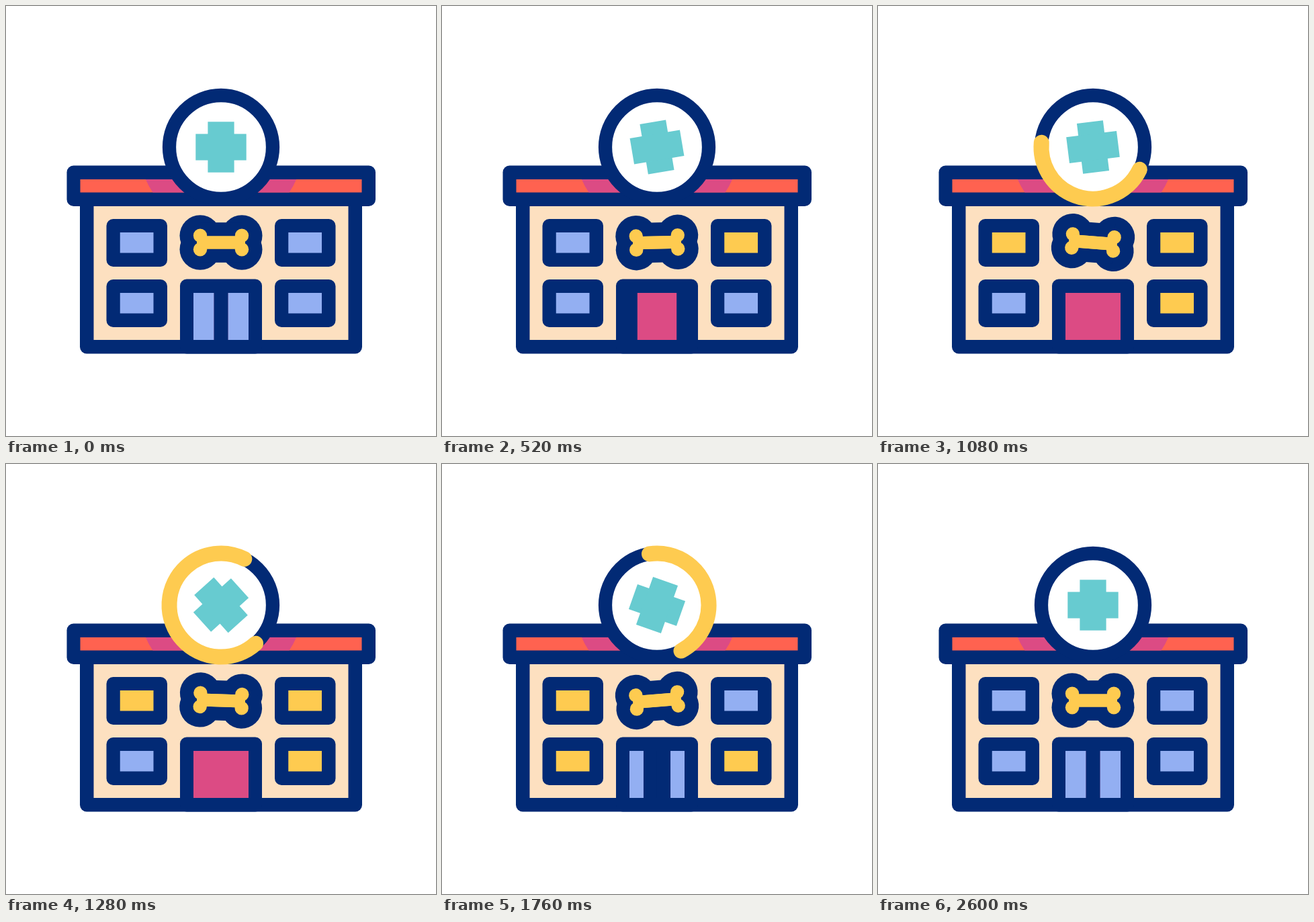
These frames come from a looping animation (640 px wide and 640 px high, 3 s). An HTML page with a canvas:

```html
<!DOCTYPE html>
<html lang="en">
<head>
<meta charset="utf-8">
<title>Pet clinic</title>
<style>
  html, body { margin: 0; width: 100%; height: 100%; overflow: hidden; background: #fff; }
  canvas { display: block; width: 640px; height: 640px; }
</style>
</head>
<body>
<canvas id="stage" width="640" height="640"></canvas>
<script>
const ctx = document.getElementById('stage').getContext('2d');
const LOOP = 3000, STEP = 40;
const NAVY = '#022a75', GOLD = '#fecb50', TEAL = '#67cbd0', BLUE = '#93aff2';
const PINK = '#dc4b84', RED = '#ff6250', WALL = '#fde0c0', WHITE = '#fff';
const SIGN = { x: 320, y: 210, r: 77 };

// Rotation in degrees as [time, angle] keys.
const CROSS_TURN = [[200, 0], [520, 80.5], [840, 184], [1280, 318], [1760, 379.5], [2200, 376], [2600, 360]];
const BONE_SWING = [[230, 0], [400, -3], [880, 5.2], [1280, 2], [1720, -4.6], [2160, 0]];

const WINDOWS = [
  { x: 400, y: 317, on: 360 },
  { x: 149.5, y: 317, on: 710 },
  { x: 400, y: 407, on: 1060 },
  { x: 149.5, y: 407, on: 1410 }
];
const LIT_TIME = 1110;

const rad = deg => deg * Math.PI / 180;

function ease(t, from, to) {
  const x = Math.min(1, Math.max(0, (t - from) / (to - from)));
  return x * x * (3 - 2 * x);
}

// Smooth curve through the keys, at rest at both ends.
function track(keys, t) {
  const last = keys.length - 1;
  if (t <= keys[0][0]) return keys[0][1];
  if (t >= keys[last][0]) return keys[last][1];
  const slope = i => i === 0 || i === last ? 0 :
    (keys[i + 1][1] - keys[i - 1][1]) / (keys[i + 1][0] - keys[i - 1][0]);
  const i = keys.findIndex(k => k[0] > t) - 1;
  const [t0, a] = keys[i], [t1, b] = keys[i + 1];
  const d = t1 - t0, x = (t - t0) / d, y = 1 - x;
  return a * y * y * (1 + 2 * x) + b * x * x * (1 + 2 * y) +
    d * x * y * (slope(i) * y - slope(i + 1) * x);
}

function box(color, x, y, w, h) {
  ctx.fillStyle = color;
  ctx.fillRect(x, y, w, h);
}

function roundBox(x, y, w, h) {
  ctx.fillStyle = NAVY;
  ctx.beginPath();
  ctx.roundRect(x, y, w, h, 10);
  ctx.fill();
}

function disc(color, x, y, r) {
  ctx.fillStyle = color;
  ctx.beginPath();
  ctx.arc(x, y, r, 0, 2 * Math.PI);
  ctx.fill();
}

function clipped(x, y, w, h, draw) {
  ctx.save();
  ctx.beginPath();
  ctx.rect(x, y, w, h);
  ctx.clip();
  draw();
  ctx.restore();
}

function turned(x, y, deg, draw) {
  ctx.save();
  ctx.translate(x, y);
  ctx.rotate(rad(deg));
  draw();
  ctx.restore();
}

function drawBuilding() {
  roundBox(110, 277, 420, 240.5);
  box(WALL, 130.5, 297, 379, 200);
  roundBox(90.5, 237.5, 459.5, 60.5);
  clipped(110.5, 258, 419, 19.5, () => {
    box(RED, 110, 258, 420, 20);
    disc(PINK, SIGN.x, SIGN.y, 122);
  });
}

function drawWindows(t) {
  for (const { x, y, on } of WINDOWS) {
    const lit = t >= on && t < on + LIT_TIME;
    roundBox(x, y, 90.5, 71);
    box(lit ? GOLD : BLUE, x + 20.25, y + 20, 49.75, 30.5);
  }
}

function drawDoor(t) {
  const slide = 52 * (ease(t, 200, 670) - ease(t, 1420, 1890));
  roundBox(259, 406.5, 122, 111);
  clipped(279, 427, 82, 70, () => {
    box(PINK, 279, 427, 82, 70);
    box(BLUE, 258, 427, 51.7 - slide, 70);
    box(BLUE, 330.3 + slide, 427, 52, 70);
    box(NAVY, 309.7 - slide, 427, 20.6, 70);
    box(NAVY, 309.7 + slide, 427, 20.6, 70);
  });
}

function boneShape(color, grow) {
  for (const x of [-31, 31]) {
    for (const y of [-10.2, 10.2]) disc(color, x, y, 10.2 + grow);
  }
  box(color, -36, -9.5 - grow * 0, 72, 19);
  box(color, -31, -9.5 - grow, 62, 19 + 2 * grow);
}

function drawBone(t) {
  turned(320, 352, track(BONE_SWING, t), () => {
    boneShape(NAVY, 20.3);
    boneShape(GOLD, 0);
  });
}

function ring(color, width, from, to) {
  ctx.strokeStyle = color;
  ctx.lineWidth = width;
  ctx.lineCap = 'round';
  ctx.beginPath();
  ctx.arc(SIGN.x, SIGN.y, SIGN.r, rad(from), rad(to));
  ctx.stroke();
}

function drawSign(t) {
  disc(WHITE, SIGN.x, SIGN.y, SIGN.r);
  ring(NAVY, 20.3, 0, 360);
  turned(SIGN.x, SIGN.y, track(CROSS_TURN, t), () => {
    box(TEAL, -37.7, -19.6, 75.4, 39.2);
    box(TEAL, -19.6, -37.7, 39.2, 75.4);
  });
  if (t > 600 && t < 2280) {
    const offset = 90 * (t - 600) / 1680;
    const tail = offset + 360 * ease(t, 1160, 2280);
    const head = offset + 360 * ease(t, 600, 1640);
    ring(GOLD, 23, tail, head);
  }
}

function render(now) {
  const t = Math.floor(now % LOOP / STEP) * STEP;
  box(WHITE, 0, 0, 640, 640);
  drawBuilding();
  drawWindows(t);
  drawDoor(t);
  drawBone(t);
  drawSign(t);
}

let start;
function tick(now) {
  start ??= now;
  render(Math.max(0, now - start));
  requestAnimationFrame(tick);
}
render(0);
requestAnimationFrame(tick);
</script>
</body>
</html>
```
